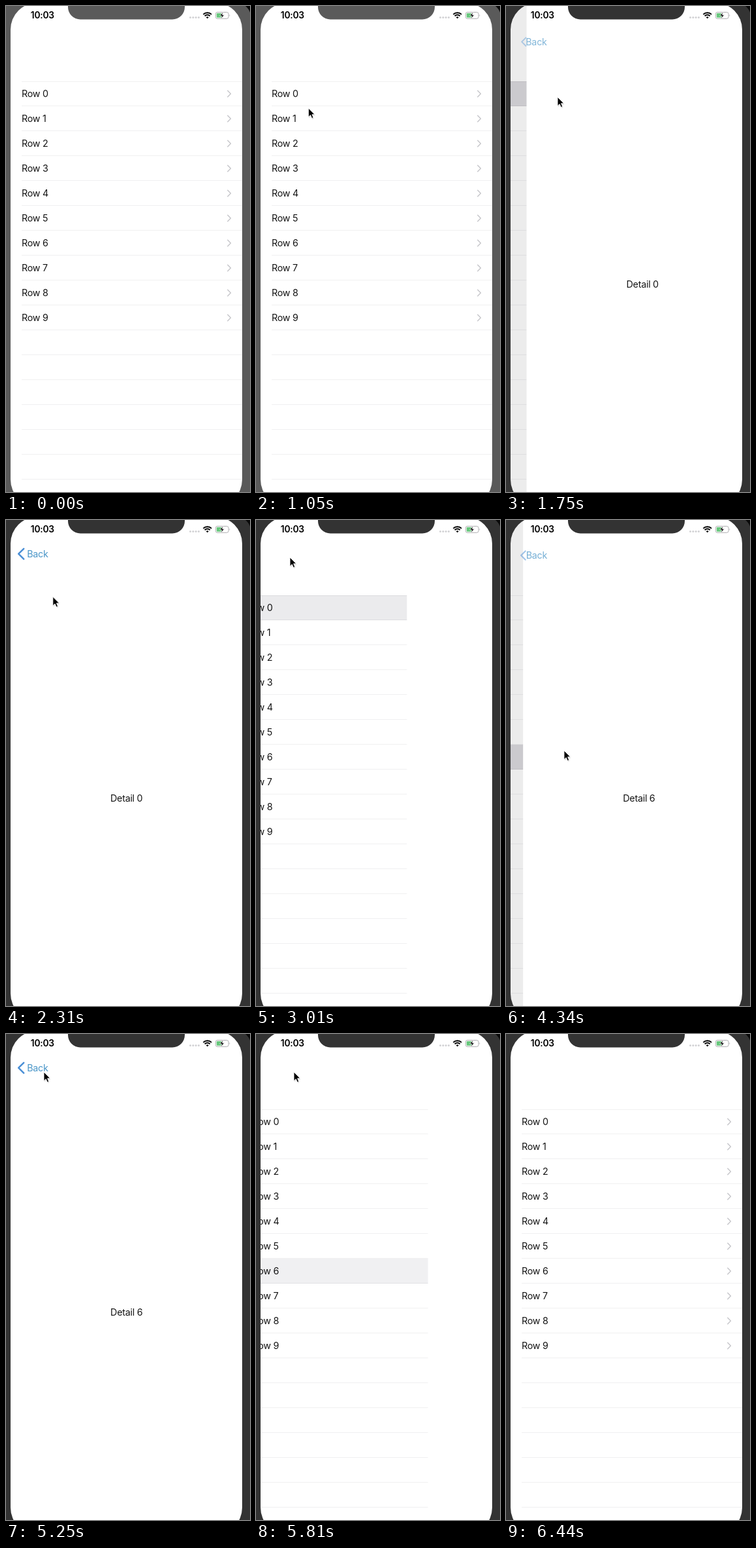
Animation of 374x742 px, one loop 6.58 s. Source, as an HTML page:

```html
<!DOCTYPE html>
<html lang="en">
<head>
<meta charset="utf-8">
<title>List and detail</title>
<style>
  html, body { margin: 0; width: 100%; height: 100%; overflow: hidden; background: #333; }
  svg { display: block; width: 374px; height: 742px; }
  text { font: 400 14.3px Inter, Roboto, sans-serif; letter-spacing: -.25px; fill: #151515; }
  .time { font-size: 13.8px; font-weight: 600; fill: #000; }
  .bezel { fill: #333; }
  .inactive .bezel { fill: #5a5a5a; }
  .line { fill: none; stroke-linecap: round; stroke-linejoin: round; }
  .rule { fill: #f0f0f1; }
  #mark { mix-blend-mode: multiply; }
</style>
</head>
<body>
<svg id="stage" viewBox="0 0 374 742">
  <defs>
    <clipPath id="screen"><rect x="7" y="-5" width="355" height="769" rx="41"/></clipPath>
  </defs>
  <rect class="bezel" width="374" height="742"/>
  <path d="M367 0H374V10Q372 4 367 0Z" fill="#080808"/>

  <g clip-path="url(#screen)">
    <rect x="7" y="-5" width="355" height="769" fill="#fff"/>
    <g id="list">
      <rect x="7" y="-5" width="355" height="769" fill="#fff"/>
      <g id="rows"></g>
      <rect id="mark" x="7" width="355" height="38" fill="#dbdadf"/>
    </g>
    <rect id="dim" x="7" y="-5" width="355" height="769" fill="#000"/>
    <g id="detail">
      <rect x="7" y="-5" width="355" height="769" fill="#fff"/>
      <text id="label" x="184.7" y="430" text-anchor="middle"></text>
    </g>
    <g id="back">
      <path id="arrow" class="line" d="M27.2 43.8L19.2 51.7L27.2 59.6" stroke="#4a8fd6" stroke-width="2.5"/>
      <text id="backText" x="32.2" y="56.7" style="fill:#4a96c8">Back</text>
    </g>

    <text class="time" x="37.8" y="19.3">10:03</text>
    <g fill="#d2d2d4">
      <circle cx="282.5" cy="17.4" r="1.5"/><circle cx="286.8" cy="17.4" r="1.5"/>
      <circle cx="291.1" cy="17.4" r="1.5"/><circle cx="295.4" cy="17.4" r="1.5"/>
    </g>
    <g fill="none" stroke="#000" stroke-width="2">
      <path d="M302.4 12.9A8.9 8.9 0 0 1 315 12.9"/>
      <path d="M304.7 15.3A5.6 5.6 0 0 1 312.7 15.3"/>
      <path d="M308.7 19.2l-2-2a2.9 2.9 0 0 1 4 0z" fill="#000" stroke="none"/>
    </g>
    <rect x="321.3" y="9.5" width="19.8" height="9.8" rx="2.7" fill="#fff" stroke="#aeaeb0"/>
    <path d="M342.5 12.7q1.7 1.7 0 3.4z" fill="#aeaeb0"/>
    <rect x="322.8" y="11" width="7.6" height="6.8" rx="1.2" fill="#67c77c"/>
    <path d="M332.6 9.6L327.6 15H330.6L329.6 19.2L334.6 13.7H331.6Z" fill="#000" stroke="#fff" stroke-width=".7"/>
  </g>

  <path class="bezel" d="M95 0H274V1A19 19 0 0 1 255 20.5H114A19 19 0 0 1 95 1Z"/>
  <g id="cursor">
    <path d="M1 1V15L4 12.3L6 17L8.4 16L6.4 11.4H10.5Z" fill="#000" opacity=".14"/>
    <path d="M0 0V13.6L3.2 10.7L5.3 15.6L7.7 14.6L5.6 9.8H9.8Z" fill="#000" stroke="#fff" stroke-width=".9"/>
  </g>
</svg>
<script>
const LOOP = 6580, TICK = 70, WIDTH = 355, TOP = 115, ROW = 38;
const TAP_HOLD = 130, ENTER = 280, LEAVE = 6440;
const $ = id => document.getElementById(id);
const move = (el, x, y = 0) => el.setAttribute('transform', `translate(${x} ${y})`);

const visits = [
  { row: 0, tap: 1330, press: 2870, pop: 2867 },
  { row: 6, tap: 3900, press: 5530, pop: 5640 }
];

const entry = { x: 147, y: 551 };
const trips = [
  { from: ENTER, to: 420, x: 138, y: 351 },
  { from: 490, to: 770, x: 61, y: 138 },
  { from: 770, to: 840, x: 82, y: 177 },
  { from: 980, to: 1190, x: 79, y: 139 },
  { from: 2240, to: 2730, x: 52, y: 57 },
  { from: 3220, to: 3780, x: 89, y: 352 },
  { from: 4480, to: 5250, x: 58, y: 58 },
  { from: 5810, to: LEAVE, x: 216, y: 742 }
];

function buildRows() {
  const rule = y => `<rect class="rule" x="24" y="${y}" width="338" height="1"/>`;
  let html = rule(TOP);
  for (let i = 0; i < 17; i++) {
    const y = TOP + i * ROW;
    html += rule(y + ROW - 1);
    if (i < 10) {
      html += `<text x="24" y="${y + 24.4}">Row ${i}</text>
        <path class="line" d="M339.8 ${y + 14.2}l4.6 4.8l-4.6 4.8" stroke="#c8c8cc" stroke-width="1.5"/>`;
    }
  }
  $('rows').innerHTML = html;
}

// Critically damped spring, 1 at the start and 0 at rest
function spring(ms) {
  const x = Math.max(0, ms) * .015;
  return x > 9 ? 0 : (1 + x) * Math.exp(-x);
}

// Each trip slows down towards its end
function pointAt(t) {
  let { x, y } = entry;
  for (const trip of trips) {
    const k = Math.min(1, Math.max(0, (t - trip.from) / (trip.to - trip.from)));
    const eased = k * (2 - k);
    x += (trip.x - x) * eased;
    y += (trip.y - y) * eased;
  }
  return [x, y];
}

function draw(t) {
  const v = t < visits[1].tap ? visits[0] : visits[1];
  const popping = t >= v.pop;
  const away = popping ? 1 - spring(t - v.pop) : spring(t - v.tap - TAP_HOLD);
  const shown = 1 - away;

  $('stage').classList.toggle('inactive', t < visits[0].tap);
  move($('list'), -.3 * WIDTH * shown);
  move($('detail'), WIDTH * away);
  $('label').textContent = 'Detail ' + v.row;
  $('dim').setAttribute('opacity', popping ? 0 : .08 * shown);

  $('mark').setAttribute('y', TOP + v.row * ROW);
  $('mark').setAttribute('opacity', t < v.tap ? 0 : popping ? Math.min(1, shown * 1.5) : 1);

  const pressed = t >= v.press ? .4 : 1;
  $('back').setAttribute('opacity', pressed * Math.max(0, 1 - 4.5 * away));
  move($('backText'), -28 * away, 43 * away);
  $('arrow').setAttribute('transform',
    `translate(${18 + 75 * away} ${51.7 + 43 * away}) scale(${Math.max(.3, 1 - 3 * away)}) translate(-18 -51.7)`);
  $('arrow').setAttribute('opacity', Math.max(0, 1 - 6 * away));

  const visible = t >= ENTER && t < LEAVE;
  $('cursor').setAttribute('visibility', visible ? 'visible' : 'hidden');
  move($('cursor'), ...pointAt(t));
}

buildRows();
draw(0);
const start = performance.now();
(function frame() {
  const t = (performance.now() - start) % LOOP;
  draw(Math.floor(t / TICK) * TICK);
  requestAnimationFrame(frame);
})();
</script>
</body>
</html>
```
